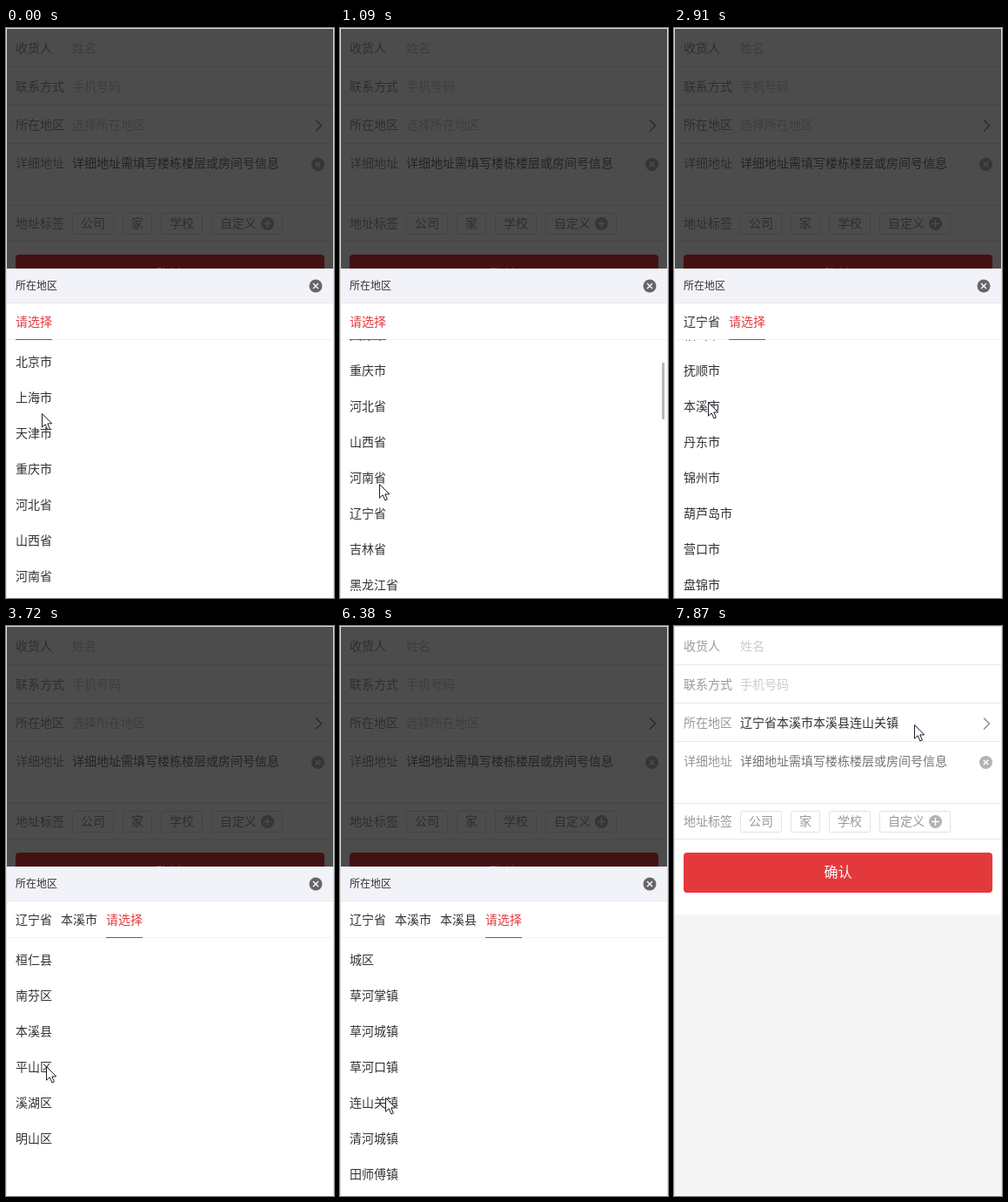
These frames come from a looping animation (377 px wide and 654 px high, 8 s). An HTML page:

```html
<!DOCTYPE html>
<html lang="zh-CN">
<head>
<meta charset="utf-8">
<title>所在地区</title>
<style>
  html, body { margin: 0; width: 100%; height: 100%; overflow: hidden; background: #fff; }
  svg { display: block; width: 377px; height: 654px; }
  text { font: 14px "Noto Sans CJK SC", "Noto Sans CJK", sans-serif; fill: #333; }
  .label { fill: #999; }
  .hint { fill: #ccc; }
  .note { fill: #757575; }
  .line { fill: #e8e8e8; }
  .tag { fill: none; stroke: #e2e2e2; }
  .badge { fill: #b2b2b2; }
  .badge path { stroke: #fff; stroke-width: 1.4; fill: none; }
  .dark { fill: #666; }
  .active { fill: #e4393c; }
  .small { font-size: 12px; }
  .confirm { font-size: 16px; fill: #fff; text-anchor: middle; }
</style>
</head>
<body>
<svg viewBox="0 0 377 654">
  <defs>
    <clipPath id="listClip"><rect x="1" y="358" width="375" height="296"/></clipPath>
  </defs>

  <rect width="377" height="654" fill="#f5f5f5"/>
  <rect width="377" height="331" fill="#fff"/>
  <g id="form">
    <rect x="11" y="260" width="355" height="46" rx="4" fill="#e4393c"/>
    <text class="confirm" x="188.5" y="288">确认</text>
    <path d="M356 105.5l6.5 6.5l-6.5 6.5" fill="none" stroke="#888" stroke-width="1.3"/>
    <g class="badge" transform="translate(358.5 156.5)">
      <circle r="7.5"/><path d="M-2.8-2.8l5.6 5.6M2.8-2.8l-5.6 5.6"/>
    </g>
    <g class="badge" transform="translate(300.5 224.5)">
      <circle r="7.5"/><path d="M-4.5 0h9M0-4.5v9"/>
    </g>
  </g>

  <g id="picker">
    <rect x="1" y="1" width="375" height="275" fill="#000" opacity=".7"/>
    <rect x="1" y="276" width="375" height="378" fill="#fff"/>
    <rect x="1" y="276" width="375" height="39" fill="#f2f2f9"/>
    <rect x="1" y="315" width="375" height="1" fill="#e6e6e8"/>
    <text class="small" x="11" y="300">所在地区</text>
    <g class="badge dark" transform="translate(356 296)">
      <circle r="7.5"/><path d="M-3-3l6 6M3-3l-6 6"/>
    </g>
    <rect x="1" y="357" width="375" height="1" fill="#f1f1f1"/>
    <g id="tabs"></g>
    <rect id="underline" y="357" width="42" height="1" fill="#6a6060"/>
    <g clip-path="url(#listClip)"><g id="list"></g></g>
    <rect id="bar" x="370" width="3" height="65" fill="#b8b8b8"/>
  </g>

  <path d="M.5 654V.5H376.5V654" fill="none" stroke="#ddd"/>
  <path id="cursor" d="M.5.5V16.2L4.2 12.8L6.9 19L9.4 17.9L6.8 11.9H11.7Z"
        fill="#fff" stroke="#1c1c2c" stroke-linejoin="round"/>
</svg>
<script>
const NS = 'http://www.w3.org/2000/svg';
const $ = id => document.getElementById(id);

function add(parent, tag, attrs, content = '') {
  const el = document.createElementNS(NS, tag);
  for (const k in attrs) el.setAttribute(k, attrs[k]);
  el.textContent = content;
  return parent.appendChild(el);
}

// Form
const form = $('form');
for (const y of [44, 88, 132, 203, 244])
  add(form, 'rect', { class: 'line', x: 1, y, width: 375, height: 1 });
[['收货人', 23], ['联系方式', 67], ['所在地区', 111], ['详细地址', 155], ['地址标签', 224]]
  .forEach(([s, y]) => add(form, 'text', { class: 'label', x: 11, y: y + 5 }, s));
add(form, 'text', { class: 'hint', x: 76, y: 28 }, '姓名');
add(form, 'text', { class: 'hint', x: 76, y: 72 }, '手机号码');
const region = add(form, 'text', { x: 76, y: 116 });
add(form, 'text', { class: 'note', x: 76, y: 160 }, '详细地址需填写楼栋楼层或房间号信息');
[['公司', 76, 47], ['家', 134, 33], ['学校', 178, 47], ['自定义', 236, 81]].forEach(([s, x, width]) => {
  add(form, 'rect', { class: 'tag', x: x + .5, y: 212.5, width, height: 24, rx: 2 });
  add(form, 'text', { class: 'label', x: x + 10, y: 229 }, s);
});

// Picker levels
const picks = ['辽宁省', '本溪市', '本溪县', '连山关镇'];
const pickTimes = [1720, 3220, 4390, 6810];
const levels = [
  '北京市 上海市 天津市 重庆市 河北省 山西省 河南省 辽宁省 吉林省 黑龙江省',
  '沈阳市 大连市 鞍山市 抚顺市 本溪市 丹东市 锦州市 葫芦岛市 营口市 盘锦市',
  '桓仁县 南芬区 本溪县 平山区 溪湖区 明山区',
  '城区 草河掌镇 草河城镇 草河口镇 连山关镇 清河城镇 田师傅镇'
].map(s => s.split(' '));

function setLevel(n) {
  const done = n === levels.length;
  $('picker').style.display = done ? 'none' : '';
  region.textContent = done ? picks.join('') : '选择所在地区';
  region.setAttribute('class', done ? '' : 'hint');
  if (done) return;
  $('tabs').textContent = $('list').textContent = '';
  [...picks.slice(0, n), '请选择'].forEach((s, i) =>
    add($('tabs'), 'text', { class: i === n ? 'active' : '', x: 11 + 52 * i, y: 342 }, s));
  $('underline').setAttribute('x', 11 + 52 * n);
  levels[n].forEach((s, i) => add($('list'), 'text', { x: 11, y: 388 + 41 * i }, s));
}

// The screen refreshes in bursts: [first, last, count]
const bursts = [
  [130, 1090, 8], [1320, 1450, 2], [1720, 2240, 5], [2360, 2630, 3], [2780, 2910, 2],
  [3220, 3720, 5], [3870, 4020, 2], [4390, 4900, 5], [5050, 5170, 2],
  [5540, 6380, 7], [6810, 7710, 8], [7870, 7870, 1]
];
const ticks = [0];
for (const [a, b, n] of bursts)
  for (let i = 0; i < n; i++) ticks.push(a + (n > 1 ? (b - a) * i / (n - 1) : 0));

// Pointer path: [time, x, y]
const path = [
  [0, 41, 442], [1090, 45, 523], [1450, 38, 552], [1720, 38, 552], [2240, 98, 389],
  [2630, 47, 448], [2910, 39, 429], [3220, 39, 429], [3720, 46, 505], [4020, 44, 462],
  [4390, 44, 462], [4900, 131, 364], [5170, 135, 341], [5540, 135, 341],
  [6380, 52, 541], [6810, 52, 541], [7710, 275, 115], [7870, 276, 113], [8000, 276, 113]
];

const ease = p => p * p * (3 - 2 * p);
const span = (t, a, b) => Math.min(1, Math.max(0, (t - a) / (b - a)));

function pointer(t) {
  const i = Math.max(1, path.findIndex(p => p[0] >= t));
  const [a, x0, y0] = path[i - 1], [b, x1, y1] = path[i];
  const p = ease(span(t, a, b));
  return [x0 + (x1 - x0) * p, y0 + (y1 - y0) * p].map(Math.round);
}

let level = -1;
function draw(now) {
  const time = now % 8000;
  const t = ticks.filter(v => v <= time + .5).pop();
  const n = pickTimes.filter(v => v <= t).length;
  if (n !== level) setLevel(level = n);

  const scroll = n > 1 ? 0 : Math.round(113 * ease(span(t, 480, 860)));
  $('list').setAttribute('transform', `translate(0 ${-scroll})`);
  $('bar').setAttribute('y', 360 + Math.round(scroll * .215));
  $('bar').setAttribute('opacity', scroll && t < 1450 ? (t < 1320 ? 1 : .5) : 0);
  $('cursor').setAttribute('transform', `translate(${pointer(t)})`);
}

const start = performance.now();
function loop() {
  draw(performance.now() - start);
  requestAnimationFrame(loop);
}
loop();
</script>
</body>
</html>
```
